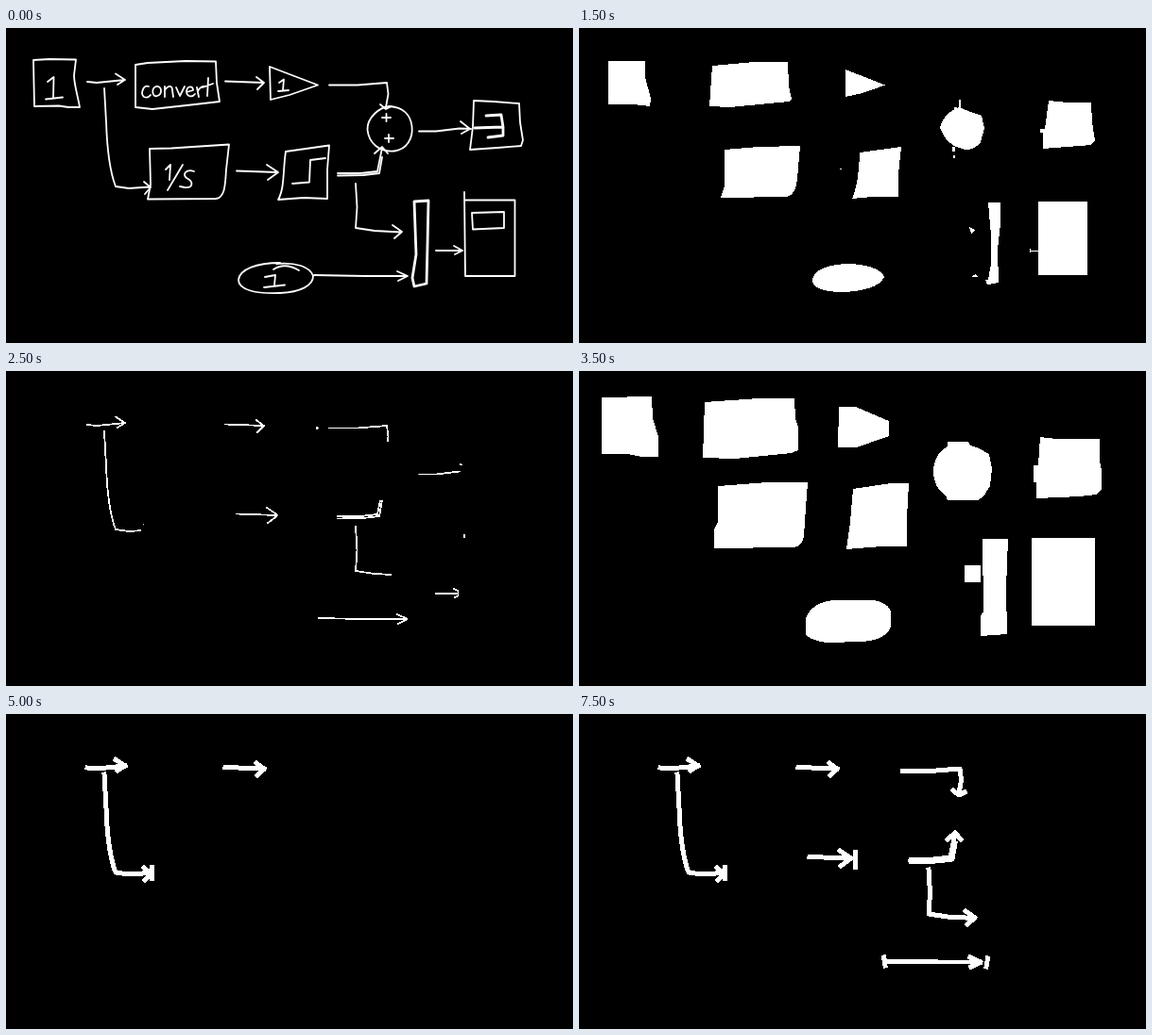
Write an HTML page without scripts that moves like this. It is 600x334 px and loops after 8 s.

```html
<!DOCTYPE html>
<html lang="en">
<head>
<meta charset="utf-8">
<title>Block sketch segmentation</title>
<style>
html, body { margin: 0; width: 100%; height: 100%; overflow: hidden; background: #000; }
svg { display: block; width: 600px; height: 334px; }
.ink { fill: none; stroke: #fff; stroke-width: 1.8; stroke-linejoin: round; stroke-linecap: round; }
.crisp { shape-rendering: crispEdges; }
.bold { stroke-width: 2.8; }
.thick { stroke-width: 5; stroke-linecap: square; stroke-linejoin: round; }
.solid { fill: #fff; }

/* one 500 ms slot per step, eight seconds in all */
.step, .half, .add { opacity: 0; animation: step 8s step-end infinite both; animation-delay: calc(var(--i) * .5s - 8s); }
.half { animation-name: half; animation-delay: 0s; }
.add { animation-name: add; }
@keyframes step { 0% { opacity: 1 } 6.25%, 100% { opacity: 0 } }
@keyframes half { 0% { opacity: 0 } 50%, 100% { opacity: 1 } }
@keyframes add { 0% { opacity: 1 } 50%, 100% { opacity: 0 } }
</style>
</head>
<body>
<svg viewBox="0 0 600 334" role="img" aria-label="Hand-drawn block diagram: 1, convert, 1/s, step, sum and scope">
<defs>
  <!-- connectors -->
  <path id="c1" d="M86 57L96 58L126 55M116 48.500L126 55L118 60"/>
  <path id="c2" d="M104 64L106 100C107 130 111 155 116 168L130 170L152 168.500M146 163L153 169L147 176"/>
  <path id="c3" d="M232 56.500L273 58M265 52L273 58L266 65"/>
  <path id="c4" d="M244 151.500L287 153M276 145L288 153L277 161"/>
  <path id="c5" d="M326 262L380 263L424 263M414 258L425 263L415 268"/>
  <path id="c6" d="M342 60.500L372 60.500L403 58L404.500 70L402 84M396 81L402 86L408 83"/>
  <path id="c7" d="M351 154L375 154L393 152L396 137L398 127M351 156.500L378 156L395 154L398 137M390 133L398 126L404 133"/>
  <path id="c8" d="M370 165L371.500 190L370 212L390 215L418 216.500M409 209L419 216L411 223"/>

  <g id="boxes">
    <path d="M29 34L46 33L74 33.500L72 50C72 60 76 72 78 84L66 84L56 82.500L30 83Z"/>
    <path d="M137 39L150 37L190 35L222 35.500L223 58L226 78L200 81L155 86L137 84Z"/>
    <path d="M279 41L280 76L300 71L330 60.500Z"/>
    <path d="M406 83C395 84 382 95 382.500 108C384 122 395 132 411 130.500C424 129 431 117 429.500 104C428 92 420 84 406 83"/>
    <path d="M495 77L516 78L543 80L544 100L547 119L545 125L520 127L491 129L494 105Z"/>
    <path d="M152 128L175 127.500L236 123.500L233 150C232 165 232 180 222 181L150 181.500L153 166Z"/>
    <path d="M296 131L342 124.500L340 150L340 181L315 180L288 182C295 170 293 150 296 131"/>
    <path class="bold" d="M432 184L447 183L446 230L445 271L432 274L430 265L434 240Z"/>
    <path d="M485 174L486 263L538.500 263L538.500 182.500L486 182.500"/>
    <path d="M290 249C265 249 247 256 246 267C246 278 265 282 290 281C312 280 325 273 325 263C322 253 306 248 286 250"/>
  </g>

  <g id="marks">
    <path d="M44 57L50.500 52L50 74M42 75.500L60 73.500"/>
    <path d="M151 62C145 60 142 70 146 73Q150 75 153 71M159 62C153 64 155 74 160 72C166 70 165 61 159 62M168 62V73M168 66C172 60 176 61 176 66L177 73M180 63L184 72L189 62M191 68L198 66C198 61 192 61 191 67C191 73 197 74 200 70M202 63L204 73M203 67Q206 61 211 62M214 53L213 72M208 63L219 59"/>
    <path d="M289 58L294 54.500L293 66M288 67L299 66"/>
    <path d="M398 95H407M402.500 91V99M401 117H410M405 113V121"/>
    <path d="M169 150L174 145L173 161M187 145L171 172M199 152C191 149 186 155 191 159C199 163 198 170 189 169L184 168"/>
    <path d="M303 165L321 163.500L322 140L338 138"/>
    <path class="bold" d="M496 106L525 105M508 93L524 92L526 105L526 114L510 116"/>
    <path d="M493 196L527 195L527 212L494 213.500Z"/>
    <path d="M274 264L285 262L284 273M273 275L295 272.500M283 256Q295 248 310 257"/>
  </g>

  <g id="sketch">
    <use href="#boxes"/><use href="#marks"/>
    <use href="#c1"/><use href="#c2"/><use href="#c3"/><use href="#c4"/>
    <use href="#c5"/><use href="#c6"/><use href="#c7"/><use href="#c8"/>
    <path d="M437 109.500L455 109.500L480 106.500L492 107M481 99L491 107L482 112"/>
    <path d="M455 236L483 236M474 231L483 236L475 240"/>
  </g>

  <g id="cores">
    <path d="M31 35H70L70 52L76 75L75 83L66 82L58 81H31Z"/>
    <path d="M141 40L185 36H221L222 62L225 75L222 78L160 84L138 83Z"/>
    <path d="M282 44L324 60.500L300 69L282 73Z"/>
    <path d="M402 84L412 88L426 93L429 106L425 121Q418 130 408 129L397 125Q387 119 382 106Q385 91 402 84Z"/>
    <path d="M497 77L517 79H542L543 100L546 119L542 124L491 128V111H488V107H493Z"/>
    <path d="M154 129L190 126L234 125L231 160Q229 177 220 179L150 180L154 167Z"/>
    <path d="M297 132L341 126L338 155V179L310 179L289 181Q296 165 297 132Z"/>
    <path d="M433 185H446V207L443 235L444 270L432 272L436 250L436 220Z"/>
    <path d="M486 184H538V262H486Z"/>
    <path d="M247 267C248 257 262 251 283 250C302 250 320 255 323 264C318 275 300 279 280 280C260 280 247 276 247 267Z"/>
  </g>

  <path id="specks" d="M402 76H404V85H402ZM397 84H400V86H397ZM395 126H398V131H395ZM396 135H398V138H396ZM413 211L419 214L415 218ZM415 264L420 261L422 264ZM430 267H436V272H432ZM276 149H278V150H276ZM477 235.500H487V236.500H477ZM477 234H478V238H477Z"/>

  <g id="blobs">
    <path d="M24 28L77 27L78 50L84 70V91H66L52 88H24Z"/>
    <path d="M133 33L190 29H228L229 50L232 60V84L225 87L165 93L131 92Z"/>
    <path d="M275 38H293L328 53V69L308 76L293 81H274Z"/>
    <path d="M390 75H412L414 79L423 82L434 88L437 103L435 122L428 133L422 137H390L388 132Q375 124 375 105Q376 88 390 80Z"/>
    <path d="M488 70L505 72H551L551 95L553 105V125L548 131L530 133L484 135V118H481V100H486Z"/>
    <path d="M147 122L200 118H242L240 145L238 175Q236 187 225 187L143 188V168L147 160Z"/>
    <path d="M290 125L330 119H349L347 155V186H320L283 189L287 160Z"/>
    <path d="M408 206H425V224H408Z"/>
    <path d="M427 178H454L452 230L453 279L425 281V260L428 255Z"/>
    <path d="M479 177H545.500V270H479Z"/>
    <path d="M240 262Q247 245 270 243H312Q328 246 330 256V271Q325 285 300 287L262 288Q243 285 240 279Z"/>
  </g>

  <mask id="outside" maskUnits="userSpaceOnUse" x="0" y="0" width="600" height="334">
    <path fill="#fff" d="M0 0H600V334H0Z"/>
    <use href="#blobs" fill="#000"/>
  </mask>
  <!-- small windows where connectors meet their blocks -->
  <clipPath id="joints">
    <path d="M71 50h10v14h-10zM130 50h10v13h-10zM273 50h10v16h-10zM322 55h12v11h-12zM395 72h16v17h-16zM386 123h22v16h-22zM426 101h10v16h-10zM478 97h15v19h-15zM140 160h16v18h-16zM284 144h10v18h-10zM318 256h13v12h-13zM404 205h18v21h-18zM424 256h12v14h-12zM478 229h10v14h-10zM478 170h10v10h-10z"/>
  </clipPath>
</defs>

<path d="M0 0H600V334H0Z"/>

<g class="step ink" style="--i:0"><use href="#sketch"/></g>
<g class="step ink crisp" style="--i:1"><use href="#sketch" stroke-width="2.200"/></g>
<g class="step ink crisp" style="--i:2">
  <use href="#sketch"/>
  <use href="#cores" class="solid" stroke-width="2"/>
  <use href="#specks" class="solid" stroke="none"/>
</g>
<g class="step solid crisp" style="--i:3"><use href="#cores"/><use href="#specks"/></g>
<g class="step solid crisp" style="--i:4"><use href="#blobs"/></g>
<g class="step ink crisp" style="--i:5"><g mask="url(#outside)"><use href="#sketch"/></g></g>
<g class="step ink crisp" style="--i:6">
  <g mask="url(#outside)"><use href="#sketch"/></g>
  <g clip-path="url(#joints)"><use href="#sketch"/></g>
</g>
<g class="step solid crisp" style="--i:7"><use href="#blobs"/></g>

<!-- connectors found one by one -->
<g class="half ink thick crisp">
  <use href="#c1" class="add" style="--i:8"/>
  <g class="add" style="--i:9"><use href="#c2"/><path d="M154 162V174"/></g>
  <use href="#c3" class="add" style="--i:10"/>
  <g class="add" style="--i:11"><use href="#c4"/><path d="M292.500 146V162"/></g>
  <g class="add" style="--i:12"><use href="#c5"/><path d="M322.500 258L324 267M432.500 259L431 268"/></g>
  <use href="#c6" class="add" style="--i:13"/>
  <use href="#c7" class="add" style="--i:14"/>
  <use href="#c8" class="add" style="--i:15"/>
</g>
</svg>
</body>
</html>
```
